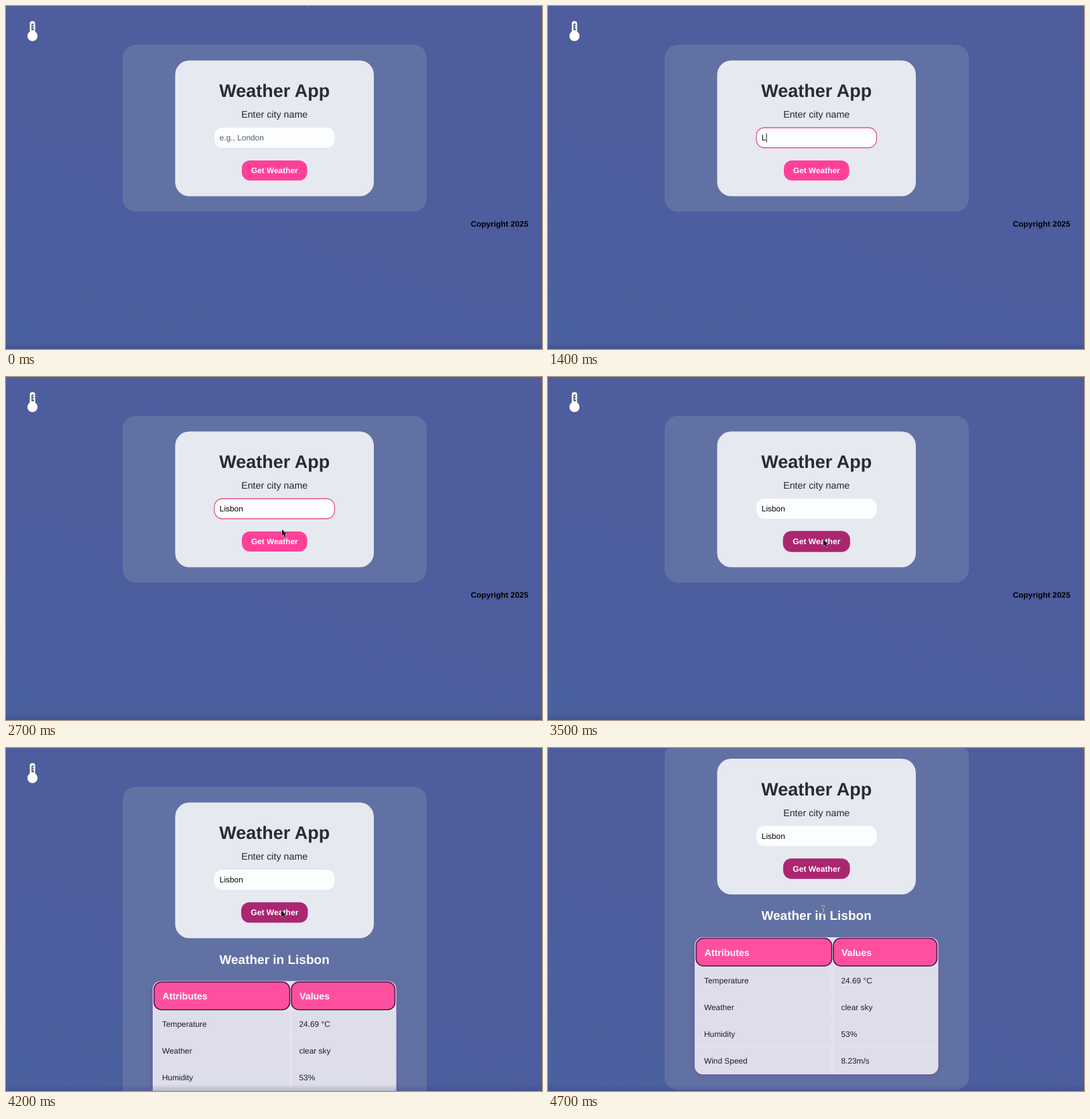
Animation, 800 px wide and 513 px high, one loop 4800 ms. Source, as an HTML page:

```html
<!DOCTYPE html>
<html lang="en">
<head>
<meta charset="utf-8">
<title>Weather App</title>
<style>
  html, body { margin: 0; width: 100%; height: 100%; overflow: hidden; }
  body { background: linear-gradient(200deg, #4f5d9d, #4d5d9e 55%, #4a609f); }
  svg { display: block; width: 100%; height: 100%; }
  text { font: 11.88px Arial, "Liberation Sans", sans-serif; fill: #1d1e26; text-rendering: geometricPrecision; }
  .bold { font-weight: bold; }
  .mid { text-anchor: middle; }
  .title { font-size: 27px; fill: #2a2b31; }
  .label { font-size: 14.25px; fill: #24262e; }
  .head { font-size: 19px; fill: #fff; }
  .th { font-size: 14.25px; fill: #fff; }
  .white { fill: #fff; }
  .cell { fill: #dedeea; }
  .thbox { fill: #ff4f9f; stroke: #42163f; stroke-width: 1.5; }
  .table { filter: drop-shadow(0 2px 4px rgba(125, 60, 160, .4)); }
</style>
</head>
<body>
<svg viewBox="0 0 800 513" preserveAspectRatio="none">
  <defs>
    <linearGradient id="edge" x2="0" y2="1">
      <stop stop-color="#28305c" stop-opacity="0"/>
      <stop offset="1" stop-color="#28305c" stop-opacity=".22"/>
    </linearGradient>
  </defs>

  <g id="page">
    <g id="thermometer">
      <rect x="35.5" y="22.5" width="8" height="22" rx="4" fill="#fff"/>
      <circle cx="39.5" cy="44.8" r="7.6" fill="#fff"/>
      <path d="M38 26.5h3.8v1.7h-2v2h2v1.6h-2v2h2v2.4H38z" fill="#555c94"/>
    </g>

    <rect id="panel" x="174" y="58" width="454" height="249.5" rx="20" fill="#6271a3"/>
    <rect x="252.5" y="81.5" width="296.5" height="203" rx="21" fill="#e6e9f0"/>
    <text class="bold mid title" x="400.7" y="136.3">Weather App</text>
    <text class="mid label" x="400.7" y="167">Enter city name</text>

    <rect id="field" x="311" y="182" width="179.5" height="30" rx="12" fill="#fcfdff" stroke="#e8528f" stroke-width="1.3"/>
    <text id="entry" x="318.8" y="201.4"></text>
    <rect id="caret" y="190.5" width="1" height="13.5" fill="#111"/>

    <g id="button">
      <rect id="buttonBox" x="352" y="231" width="97.5" height="30" rx="12"/>
      <text class="bold mid white" x="400.8" y="250.2">Get Weather</text>
    </g>

    <g id="result">
      <text class="bold mid head" x="400.6" y="322.8">Weather in Lisbon</text>
      <rect class="table" x="219" y="348.5" width="363.5" height="205" rx="12" fill="#e4e3ed"/>
      <rect class="thbox" x="221" y="350" width="202.5" height="41.5" rx="11"/>
      <rect class="thbox" x="426" y="350" width="154.5" height="41.5" rx="11"/>
      <text class="bold th" x="233.5" y="376">Attributes</text>
      <text class="bold th" x="438" y="376">Values</text>
      <g id="rows"></g>
    </g>

    <text id="copyright" class="bold" x="779.5" text-anchor="end" style="fill:#000">Copyright 2025</text>
  </g>

  <rect y="503" width="800" height="10" fill="url(#edge)"/>

  <g id="pointer">
    <path id="arrow" d="M0 0V9.6L2.2 7.6L3.8 11.2L5.5 10.4L4 7H6.9Z" fill="#000" stroke="#fff" stroke-width=".9" stroke-linejoin="round" paint-order="stroke"/>
    <g id="beam" fill="none">
      <path d="M-2.6 -6Q0 -6 0 -4Q0 -6 2.6 -6M0 -4.5V4.5M-2.6 6Q0 6 0 4Q0 6 2.6 6" stroke="#fff" stroke-width="2"/>
      <path d="M-2.6 -6Q0 -6 0 -4Q0 -6 2.6 -6M0 -4.5V4.5M-2.6 6Q0 6 0 4Q0 6 2.6 6" stroke="#222" stroke-width=".9"/>
    </g>
  </g>
</svg>

<script>
const LOOP = 4800, STEP = 100;
const $ = id => document.getElementById(id);
const show = (id, on) => $(id).setAttribute("visibility", on ? "visible" : "hidden");
const attr = (id, values) => {
  for (const key in values) $(id).setAttribute(key, values[key]);
};

const weather = [
  ["Temperature", "24.69 °C"],
  ["Weather", "clear sky"],
  ["Humidity", "53%"],
  ["Wind Speed", "8.23m/s"]
];
$("rows").innerHTML = weather.map(([name, value], i) => {
  const y = 393.5 + i * 40, last = i === weather.length - 1;
  const left = last ? "M220.5 0H423V38.5H231.5Q220.5 38.5 220.5 27.5Z" : "M220.5 0H423V38.5H220.5Z";
  const right = last ? "M426.5 0H581V27.5Q581 38.5 570 38.5H426.5Z" : "M426.5 0H581V38.5H426.5Z";
  return `<g transform="translate(0 ${y})">
    <path class="cell" d="${left}"/><path class="cell" d="${right}"/>
    <text x="233" y="23.6">${name}</text><text x="437.5" y="23.6">${value}</text></g>`;
}).join("");

// Each track lists [start time, value...] and holds until the next entry.
const typed = [[0, ""], [1200, "L"], [1600, "Li"], [1700, "Lis"], [1800, "Lisb"], [2000, "Lisbo"], [2200, "Lisbon"]];
const scroll = [[0, 0], [4300, 13], [4400, 38.3], [4500, 54], [4600, 62], [4700, 65.5]];
const pointer = [
  [0, 446, -10, "arrow"], [100, 392, 132, "arrow"], [400, 385, 150, "arrow"],
  [500, 367, 184, "beam"], [600, 360, 199.5, "beam"], [1200, 0, 0, ""],
  [2500, 388, 203, "beam"], [2600, 404, 217, "arrow"], [2700, 412, 228, "arrow"],
  [2800, 412, 237, "arrow"], [2900, 411, 243, "arrow"], [4600, 411, 242.5, "beam"]
];
const at = (track, t) => track.filter(k => k[0] <= t).pop().slice(1);

const mix = (a, b, p) => `rgb(${a.map((v, i) => Math.round(v + (b[i] - v) * p))})`;
const PINK = [255, 64, 153], DARK = [170, 38, 112];

function draw(t) {
  const [text] = at(typed, t);
  const [offset] = at(scroll, t);
  const [x, y, kind] = at(pointer, t);
  const focused = t >= 800 && t < 3200;
  const loaded = t >= 3600;

  attr("page", { transform: `translate(0 ${-offset})` });

  $("entry").textContent = text || "e.g., London";
  $("entry").style.fill = text ? "#000" : "#555a68";
  attr("field", { "stroke-opacity": focused ? 1 : 0 });
  attr("caret", { x: 319 + (text ? $("entry").getComputedTextLength() : 0) });
  show("caret", focused && t < 2500);

  const hover = Math.min(1, Math.max(0, (t - 2700) / 300));
  const size = 1 + 0.02 * hover;
  attr("button", { transform: `translate(400.75 246) scale(${size}) translate(-400.75 -246)` });
  attr("buttonBox", {
    fill: mix(PINK, DARK, hover),
    stroke: t >= 3200 && !loaded ? "#c02f80" : "none"
  });

  show("result", loaded);
  const bottom = loaded ? 577 : 307.5;
  attr("panel", { height: bottom - 58 });
  attr("copyright", { y: bottom + 22.9 });

  attr("pointer", { transform: `translate(${x} ${y})` });
  show("arrow", kind === "arrow");
  show("beam", kind === "beam");
}

const start = performance.now();
function tick() {
  const t = (performance.now() - start) % LOOP;
  draw(Math.floor(t / STEP) * STEP);
  requestAnimationFrame(tick);
}
tick();
</script>
</body>
</html>
```
